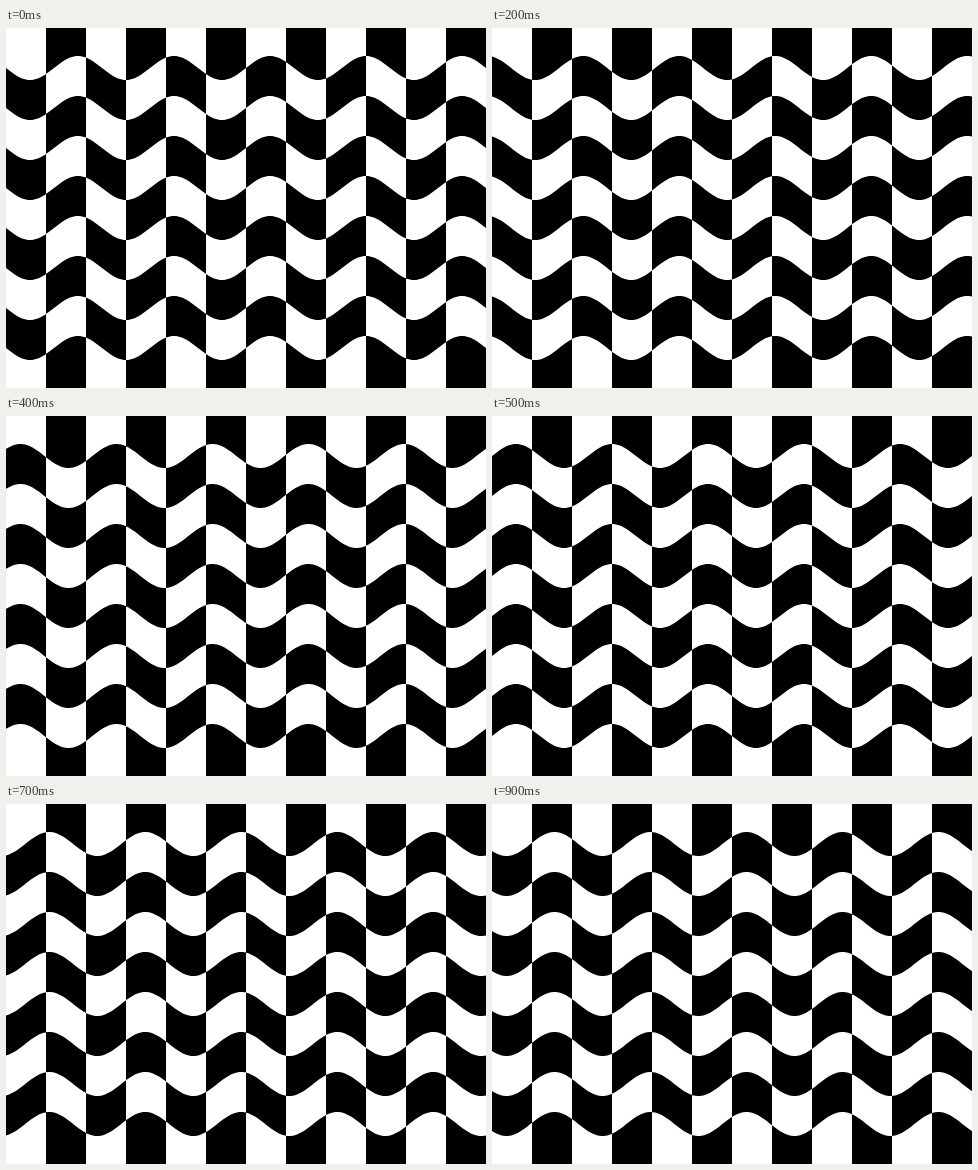
An HTML page with a canvas that plays this animation: 480x360 px, repeating every 1000 ms.

```html
<!DOCTYPE html>
<html lang="en">
<head>
<meta charset="utf-8">
<title>Wavy checkerboard</title>
<style>
  html, body { margin: 0; width: 100%; height: 100%; overflow: hidden; background: #fff; }
  canvas { display: block; }
</style>
</head>
<body>
<canvas id="stage" width="480" height="360"></canvas>
<script>
const W = 480, H = 360, CELL = 40, AMP = 12, WAVE = 96;
const LOOP = 1000, STEPS = 10;
const ctx = document.getElementById('stage').getContext('2d');

function draw(ms) {
  const step = Math.floor((ms % LOOP) / LOOP * STEPS);
  const edge = (x, y) => y + AMP * Math.sin(2 * Math.PI * (x / WAVE - step / STEPS));

  ctx.fillStyle = '#fff';
  ctx.fillRect(0, 0, W, H);

  // Stripes and wavy bands cancel where they overlap.
  ctx.beginPath();
  for (let x = CELL; x < W; x += 2 * CELL) ctx.rect(x, 0, CELL, H);
  for (let y = CELL; y < H - CELL; y += 2 * CELL) {
    ctx.moveTo(0, edge(0, y));
    for (let x = 1; x <= W; x++) ctx.lineTo(x, edge(x, y));
    for (let x = W; x >= 0; x--) ctx.lineTo(x, edge(x, y + CELL));
    ctx.closePath();
  }
  ctx.fillStyle = '#000';
  ctx.fill('evenodd');
}

let start;
function tick(now) {
  start ??= now;
  draw(now - start);
  requestAnimationFrame(tick);
}
draw(0);
requestAnimationFrame(tick);
</script>
</body>
</html>
```
